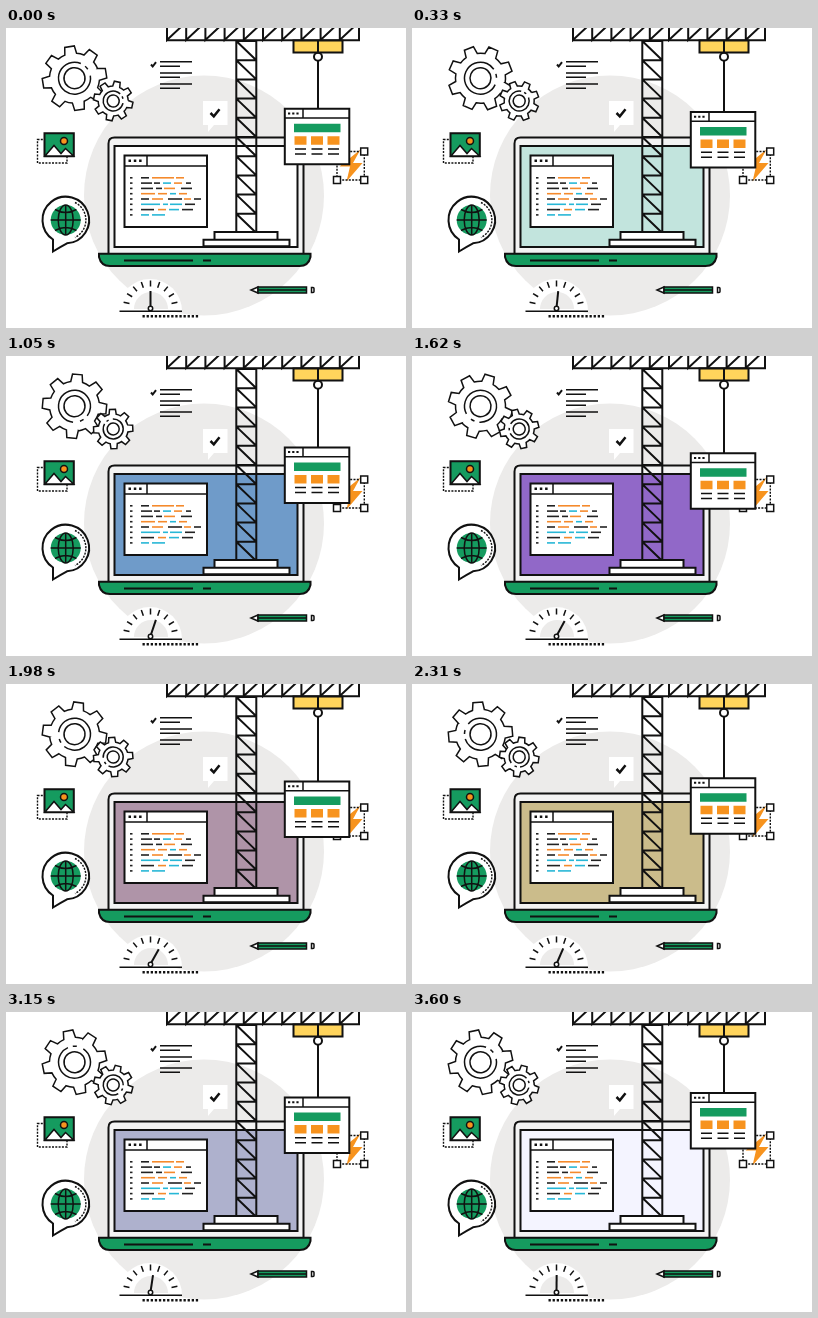
An HTML page for the animation above (3630 ms loop, 400 px wide and 300 px high).

```html
<!DOCTYPE html>
<html lang="en">
<head>
<meta charset="utf-8">
<title>Website under construction</title>
<style>
  html, body { margin: 0; width: 100%; height: 100%; overflow: hidden; background: #fff; }
  svg { display: block; width: 400px; height: 300px; }
  .ink { fill: none; stroke: #111; stroke-width: 2; }
  .white { fill: #fff; }
  .grey { fill: #ecebea; }
  .green { fill: #159b5f; }
  .orange { fill: #f7931e; }
  .thin { stroke-width: 1.5; }
  .dash { stroke-dasharray: 2 1.3; stroke-width: 1.4; }
</style>
</head>
<body>
<svg viewBox="0 0 400 300">
  <circle class="grey" cx="198" cy="167.5" r="120"/>

  <g id="gears" class="ink thin"></g>

  <!-- checklist -->
  <path class="ink" d="M145 36.5l1.700 2 3.300-4.300"/>
  <path class="ink thin" d="M154 33.800h32M154 38.300h20M154 45h32M154 49.300h20M154 56h32M154 60.300h20"/>

  <!-- speech bubble with tick -->
  <path class="white" d="M197 73h24.500v24H208l-6 7v-7h-5z"/>
  <path class="ink" style="stroke-width:2.500" d="M204.500 85l3.300 3.300 5.700-7"/>

  <!-- picture -->
  <path class="ink dash" d="M31.500 111.500h29.500v23.500h-29.500z"/>
  <path class="ink green" d="M38.500 105.300h29.300v23h-29.300z"/>
  <circle class="ink orange thin" cx="58" cy="113" r="3.500"/>
  <path class="ink white thin" d="M39 128l9-10.500 7 8 4.500-5 8 7.500z"/>

  <!-- globe -->
  <path class="ink white" d="M47 211.500A23.300 23.300 0 1 1 61 215.300Q54 219 47 223.500z"/>
  <path class="ink dash" d="M69 174.500A19.500 19.500 0 0 1 69 209.500"/>
  <circle class="green" cx="59.700" cy="192" r="15"/>
  <g class="ink thin">
    <ellipse cx="59.700" cy="192" rx="7.500" ry="15"/>
    <path d="M59.700 177v30M44.700 192h30M49 181.500q10.700 6 21.400 0M49 202.500q10.700-6 21.400 0"/>
  </g>

  <!-- gauge -->
  <path class="white" d="M112 283a32 32 0 0 1 64 0z"/>
  <path class="grey" d="M128 281a17 17 0 0 1 34 0z"/>
  <path id="ticks" class="ink thin"/>
  <path class="ink thin" d="M113.500 283.300h62.500"/>
  <path class="ink" stroke-dasharray="2.300 1.800" style="stroke-width:2.500" d="M136.500 288.300h57"/>
  <path id="needle" class="ink" d="M144.500 280V263"/>
  <circle class="ink white thin" cx="144.500" cy="280.500" r="2.200"/>

  <!-- pencil -->
  <path class="ink white thin" d="M252 259l-7 3 7 3z"/>
  <path class="ink green thin" d="M252 259h48.500v6H252z"/>
  <path class="ink thin" d="M252 262h48M305.500 259.500h1.500q1 0 1 1v3q0 1-1 1h-1.500z"/>

  <!-- laptop -->
  <path class="ink" style="fill:#f3f3f3" d="M102.500 226V115.500q0-6 6-6h183q6 0 6 6v110.500z"/>
  <path id="screen" class="ink" d="M108.500 118h183v101h-183z"/>
  <path class="ink green" d="M93 225.700h211.500v3.300q-2 9-11 9H104q-9 0-11-9z"/>
  <path class="ink" d="M118 232.500h69M197 232.500h8"/>

  <!-- code window -->
  <path class="ink white" d="M118.500 127.500h82.500v71.500h-82.500z"/>
  <path class="ink thin" d="M118 138h83M141 127.500V138"/>
  <path class="ink" style="stroke-width:2.500" stroke-dasharray="2.500 2.800" d="M122.500 132.700h13.500"/>
  <g id="code" stroke-width="1.600"></g>

  <!-- crane -->
  <path class="ink white" d="M161 -6h192v18.300H161z"/>
  <path id="truss" class="ink"/>
  <path class="ink white" d="M208.500 204h63v7.700h-63zM197.500 211.700h86v6.500h-86z"/>
  <path class="ink" style="fill:#ffd45c" d="M287.500 12.500h49v12h-49z"/>
  <circle class="ink" cx="312" cy="28.800" r="4"/>
  <path id="cable" class="ink"/>

  <!-- bolt in a selection frame -->
  <path class="orange" d="M354.500 121.500l-21 17h10.500l-3.500 15 16-18.500h-9.500z"/>
  <path class="ink dash" d="M331 123.500h27.300v28.500h-27.300z"/>
  <path class="ink white thin" d="M327.500 120h7v7h-7zM354.700 120h7v7h-7zM327.500 148.500h7v7h-7zM354.700 148.500h7v7h-7z"/>

  <!-- hanging page -->
  <g id="page">
    <path class="ink white" d="M278.800 0h64.500v55.500h-64.500z"/>
    <path class="ink thin" d="M279 9.300h64.500M297 0v9.300"/>
    <path class="ink" stroke-dasharray="2.200 2" d="M282 4.700h11"/>
    <path class="green" d="M288 15h46.500v8.500H288z"/>
    <path class="orange" d="M288.500 27.500h12V36h-12zM305 27.500h12V36h-12zM321.500 27.500h12V36h-12z"/>
    <path class="ink thin" d="M289 40.200h11M305.500 40.200h11M322 40.200h11M289 45.200h11M305.500 45.200h11M322 45.200h11"/>
  </g>
</svg>
<script>
const LOOP = 3630;
const $ = id => document.getElementById(id);

function gearPath(outer, root) {
  const step = Math.PI / 4;
  const corners = [[root, -0.24], [outer, -0.15], [outer, 0.15], [root, 0.24]];
  let d = '';
  for (let i = 0; i < 8; i++) {
    corners.forEach(([r, offset], k) => {
      const a = i * step + offset;
      const command = !d ? 'M' : k ? 'L' : `A${root} ${root} 0 0 1 `;
      d += `${command}${(r * Math.cos(a)).toFixed(2)} ${(r * Math.sin(a)).toFixed(2)}`;
    });
  }
  return d + `A${root} ${root} 0 0 1 ${root * Math.cos(-0.24)} ${root * Math.sin(-0.24)}Z`;
}

const gears = [
  { x: 68.5, y: 50.2, outer: 32.3, root: 25, rings: [16, 10.5], spin: 1, start: -9 },
  { x: 107.2, y: 73, outer: 19.8, root: 15, rings: [10, 6], spin: -1, start: 12 }
];
$('gears').innerHTML = gears.map(g => `<g>
  <path class="white" d="${gearPath(g.outer, g.root)}"/>
  <circle r="${g.rings[0]}" pathLength="100" stroke-dasharray="84 5 4 7"/>
  <circle r="${g.rings[1]}"/></g>`).join('');

let ticks = '';
for (let i = -4; i <= 4; i++) {
  const a = i * 0.34;
  const at = r => `${144.5 + r * Math.sin(a)} ${280 - r * Math.cos(a)}`;
  ticks += `M${at(21.5)}L${at(27.5)}`;
}
$('ticks').setAttribute('d', ticks);

let truss = 'M230.300 12V204M250.300 12V204';
for (let i = 0; i < 10; i++) {
  const x = 161 + i * 19.2, y = 13 + i * 19.2;
  truss += `M${x} -6V12L${x + 19.2} -6M230.300 ${y}H250.300M230.300 ${y}L250.300 ${y + 19.2}`;
}
$('truss').setAttribute('d', truss);

// Each token is a colour letter followed by its width; "_" is a gap.
const ink = { k: '#222', o: '#f58a2c', b: '#27b7d6' };
const rows = [
  'k8 _3 o22 _2 o8', 'k11 _2 k6 _3 b8 _3 o8 _4 k5', 'k12 _3 k6 _2 o11 _6 k11',
  'o14 _3 o9 _3 b6 _3 o8', 'k8 _3 o11 _5 k14 _2 o7 _3 k7', 'b19 _3 b5 _2 b12 _3 k10',
  'k13 _4 o8 _3 b10 _3 k11', 'b8 _3 b13'
];
$('code').innerHTML = rows.map((row, i) => {
  const y = 149.8 + i * 5.3;
  let x = 135;
  return `<path stroke="#222" d="M124 ${y}h2.5"/>` + row.split(' ').map(token => {
    const width = +token.slice(1), from = x;
    x += width;
    return token[0] === '_' ? '' : `<path stroke="${ink[token[0]]}" d="M${from} ${y}h${width}"/>`;
  }).join('');
}).join('');

const colours = [
  [0, 255, 255, 255], [570, 150, 208, 196], [1050, 111, 155, 201], [1620, 145, 104, 200],
  [2310, 203, 188, 139], [2730, 182, 179, 128], [3260, 172, 176, 225], [3600, 244, 244, 255],
  [LOOP, 255, 255, 255]
];

function screenColour(t) {
  const i = colours.findIndex(c => c[0] > t);
  const a = colours[i - 1], b = colours[i];
  const p = (t - a[0]) / (b[0] - a[0]);
  return `rgb(${[1, 2, 3].map(k => Math.round(a[k] + (b[k] - a[k]) * p))})`;
}

function draw(now) {
  const t = now % LOOP;
  const swing = 1 - Math.abs(2 * t / LOOP - 1);
  const top = 80.7 + 18.5 * swing;

  gears.forEach((g, i) => $('gears').children[i].setAttribute('transform',
    `translate(${g.x} ${g.y}) rotate(${g.start + g.spin * 360 * t / LOOP})`));
  $('screen').style.fill = screenColour(t);
  $('needle').setAttribute('transform', `rotate(${32 * swing} 144.5 280)`);
  $('page').setAttribute('transform', `translate(0 ${top})`);
  $('cable').setAttribute('d', `M312 12V24.5M312 32.5V${top}`);
}

let start;
function tick(now) {
  start ??= now;
  draw(now - start);
  requestAnimationFrame(tick);
}
draw(0);
requestAnimationFrame(tick);
</script>
</body>
</html>
```
